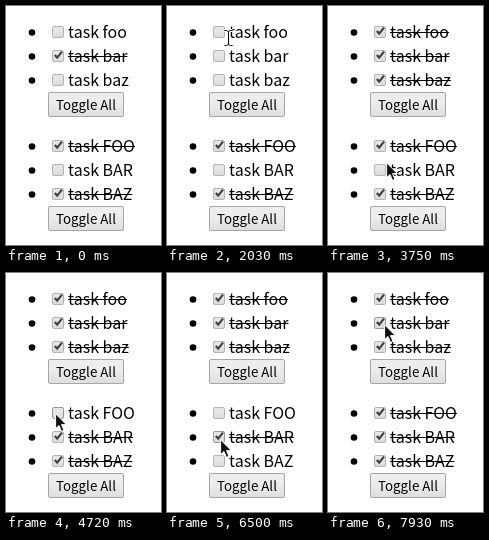
These frames come from a looping animation (155x239 px, 7.99 s). An HTML page:

```html
<!DOCTYPE html>
<html lang="en">
<head>
<meta charset="utf-8">
<title>Task lists</title>
<style>
  html, body { margin: 0; width: 100%; height: 100%; overflow: hidden; background: #fff; }
  svg { display: block; width: 100vw; height: 100vh; }
  text { font: 16px "Noto Sans CJK JP", "Noto Sans CJK SC", "Noto Sans CJK", "Noto Sans", sans-serif; }
  .button text { font-size: 13.333px; }
  .button rect { fill: url(#face); stroke: #a6a6a6; }
  .button.hover rect { fill: url(#hover); stroke: #707070; }
  .button.pressed rect { fill: url(#pressed); stroke: #707070; }
  .box { fill: url(#well); stroke: #b4b4b4; }
  .hover .box { stroke: #999; }
  .pressed .box { fill: url(#pressed); stroke: #999; }
  .tick { fill: none; stroke: #404040; stroke-width: 2.2; }
</style>
</head>
<body>
<svg id="stage" viewBox="0 0 155 239"><defs></defs></svg>
<script>
const LOOP = 7990, APPEAR = 90, PRESS = 80, LONGEST_GLIDE = 650;
const stage = document.getElementById('stage');

function add(parent, tag, attrs, text) {
  const node = document.createElementNS('http://www.w3.org/2000/svg', tag);
  for (const key in attrs) node.setAttribute(key, attrs[key]);
  if (text) node.textContent = text;
  parent.appendChild(node);
  return node;
}

function makeGradient(id, top, bottom) {
  const gradient = add(stage.querySelector('defs'), 'linearGradient', { id, x2: 0, y2: 1 });
  add(gradient, 'stop', { offset: 0.38, 'stop-color': top });
  add(gradient, 'stop', { offset: 1, 'stop-color': bottom });
}
makeGradient('face', '#ededed', '#dedede');
makeGradient('hover', '#f0f0f0', '#e0e0e0');
makeGradient('pressed', '#e7e7e7', '#d7d7d7');
makeGradient('well', '#e6e6e6', '#dadada');

function makeTask(label, y, checked) {
  const group = add(stage, 'g', { transform: `translate(0 ${y})` });
  add(group, 'circle', { cx: 26, cy: 0.5, r: 3.3 });
  add(group, 'rect', { class: 'box', x: 46.5, y: -5.5, width: 11, height: 11, rx: 1.5 });
  const tick = add(group, 'path', { class: 'tick', d: 'M48.8 -1L51.2 1.6L56 -4.4' });
  const text = add(group, 'text', { x: 62, y: 6 }, label);
  const width = text.getComputedTextLength();
  const strike = add(group, 'rect', { x: 62, y: 0, width, height: 1 });
  return { group, tick, strike, checked, y, x: 52, textEnd: 62 + width, left: 46, right: 59, reach: 6, name: 'task' };
}

function makeButton(y, list) {
  const group = add(stage, 'g', { transform: `translate(0 ${y})` });
  add(group, 'rect', { x: 42.5, y: -12.5, width: 75, height: 24, rx: 1.5 });
  add(group, 'text', { x: 50, y: 5 }, 'Toggle All');
  return { group, list, y, x: 60, left: 42, right: 118, reach: 12, name: 'button' };
}

function makeList(names, top, checkedAt) {
  return names.map((name, i) => makeTask('task ' + name, top + 24 * i, checkedAt.includes(i)));
}

const upper = makeList(['foo', 'bar', 'baz'], 26, [1]);
const lower = makeList(['FOO', 'BAR', 'BAZ'], 140, [0, 2]);
const tasks = [...upper, ...lower];
const upperToggle = makeButton(99, upper), lowerToggle = makeButton(213, lower);
const controls = [...tasks, upperToggle, lowerToggle];

const arrow = add(stage, 'path', {
  d: 'M.6 .8V15.6L4 12.5L6.5 18.4L9 17.3L6.5 11.6H11.3Z',
  fill: '#111', stroke: '#fff', 'stroke-width': 1
});
const beam = add(stage, 'g', {});
const beamShape = 'M-3.5 -7.5H-1.5L.5 -6.5L2.5 -7.5H4.5M.5 -6.5V6.5M-3.5 7.5H-1.5L.5 6.5L2.5 7.5H4.5';
add(beam, 'path', { d: beamShape, fill: 'none', stroke: '#fff', 'stroke-width': 3 });
add(beam, 'path', { d: beamShape, fill: 'none', stroke: '#000' });

const visits = [{ x: 28, y: -10, arrive: APPEAR, leave: APPEAR }];
const clicks = [];

// Each visit glides in after the previous one, then presses the control at the given times.
function visit(control, arrive, pressTimes = [], dx = 0, dy = 0) {
  const previous = visits[visits.length - 1];
  const depart = Math.max(previous.leave, arrive - LONGEST_GLIDE);
  for (const down of pressTimes) clicks.push({ control, down, up: down + PRESS });
  const leave = pressTimes.length ? clicks[clicks.length - 1].up : arrive;
  visits.push({ x: control.x + dx, y: control.y + dy, depart, arrive, leave });
}

const [foo, bar, baz] = upper, [FOO, BAR, BAZ] = lower;
visit(upperToggle, 910, [1080, 1550], 26, -8);
visit(foo, 2290, [2350], 7, 2);
visit(bar, 2570, [2770]);
visit(baz, 2990, [3190], 0, -5);
visit(BAR, 4040, [4060], 7);
visit(FOO, 4340, [4600], -3);
visit(lowerToggle, 5370, [], -17, -8);
visit(BAZ, 5560, [5670], 0, -3);
visit(BAR, 6200, [], 4, -16);
visit(BAR, 6500, [6570], 1, 2);
visit(lowerToggle, 6960, [7200]);
visit(bar, 7930, [], 4, 1);

const easeOut = k => 1 - (1 - k) ** 3;

function pointerAt(t) {
  const i = visits.findIndex(v => v.arrive > t);
  if (i < 1) return i < 0 ? visits[visits.length - 1] : visits[0];
  const from = visits[i - 1], to = visits[i];
  const k = easeOut(Math.max(0, (t - to.depart) / (to.arrive - to.depart)));
  const mix = axis => Math.round(from[axis] + (to[axis] - from[axis]) * k);
  return { x: mix('x'), y: mix('y') };
}

function checkedAt(t) {
  const checked = new Map(tasks.map(task => [task, task.checked]));
  for (const { control, up } of clicks) {
    if (up > t) break;
    const affected = control.list || [control];
    const state = affected.some(task => !checked.get(task));
    for (const task of affected) checked.set(task, state);
  }
  return checked;
}

const show = (node, on) => { node.style.display = on ? '' : 'none'; };

function render(t) {
  const { x, y } = pointerAt(t);
  const visible = t >= APPEAR;
  const active = clicks.find(c => t >= c.down && t < c.up);

  for (const control of controls) {
    const hover = visible && x >= control.left && x < control.right && Math.abs(y - control.y) <= control.reach;
    const pressed = active && active.control === control;
    control.group.setAttribute('class', `${control.name} ${pressed ? 'pressed' : hover ? 'hover' : ''}`);
  }
  for (const [task, on] of checkedAt(t)) {
    show(task.tick, on);
    show(task.strike, on);
  }

  const overText = tasks.some(task => x > 60 && x < task.textEnd && Math.abs(y - task.y) < 12);
  show(arrow, visible && !overText);
  show(beam, visible && overText);
  for (const pointer of [arrow, beam]) pointer.setAttribute('transform', `translate(${x} ${y})`);
}

const start = performance.now();
function frame() {
  render((performance.now() - start) % LOOP);
  requestAnimationFrame(frame);
}
frame();
</script>
</body>
</html>
```
